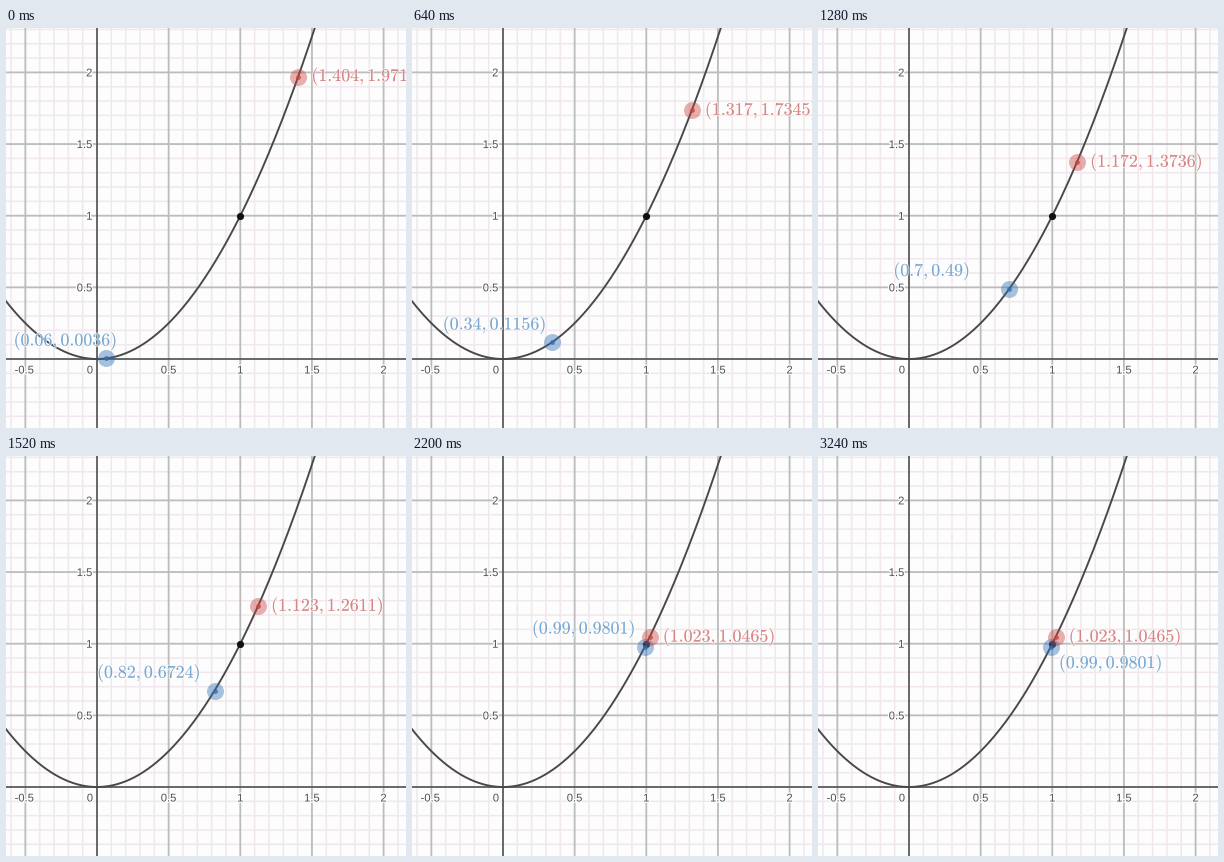
A matplotlib script that plays this animation: 400x400 px, repeating every 3960 ms.

```python
import numpy as np
import matplotlib.pyplot as plt
from matplotlib.animation import FuncAnimation
from matplotlib.patheffects import withStroke

plt.rcParams["mathtext.fontset"] = "cm"
plt.rcParams["toolbar"] = "None"

SIZE, DPI = 400, 100
PT = 72 / DPI          # points per pixel
STEP, LOOP = 40, 3960  # ms
X0, Y0, UNIT = 91, 331, 143.3
PAPER = "#fdfdfd"

# Drag path: time, x of the blue point, x of the red point, blue label offset
DRAG = np.array([
    (0, 0.06, 1.404, -92),
    (240, 0.20, 1.377, -113),
    (520, 0.28, 1.339, -112),
    (920, 0.47, 1.266, -102),
    (1280, 0.70, 1.172, -116),
    (1760, 0.94, 1.074, -119),
    (2200, 0.99, 1.023, -113),
])


def px(x):
    return X0 + UNIT * x


def py(y):
    return Y0 - UNIT * y


def pair(x):
    return f"$({x:g}, {round(x * x, 4):g})$"


def drag(now):
    """Dragged values, refreshed every 80 ms and at each key time."""
    times = DRAG[:, 0]
    t = max(now // 80 * 80, times[times <= now][-1])
    return [float(np.interp(t, times, col)) for col in DRAG.T[1:]]


fig = plt.figure(figsize=(SIZE / DPI, SIZE / DPI), dpi=DPI, facecolor=PAPER)
ax = fig.add_axes([0, 0, 1, 1])
ax.set_xlim(0, SIZE)
ax.set_ylim(SIZE, 0)
ax.axis("off")


def grid_line(k, color, width, z):
    style = dict(color=color, lw=width * PT, zorder=z, snap=False)
    ax.axvline(px(k / 10), **style)
    ax.axhline(py(k / 10), **style)


for k in range(-6, 24):
    if k % 5:
        grid_line(k, "#f0e8ec", 1.5, 1)
    elif k:
        grid_line(k, "#bcbcbc", 1.8, 2)
grid_line(0, "#5a5a5a", 1.8, 3)

xs = np.linspace(-0.7, 1.6, 300)
ax.plot(px(xs), py(xs ** 2), color="#484848", lw=1.9 * PT, zorder=4)


def tick(x, y, s, ha):
    ax.text(x, y, s, ha=ha, va="center_baseline", family="Liberation Sans",
            size=11.2 * PT, color="#505050", zorder=5,
            path_effects=[withStroke(linewidth=2.5 * PT, foreground=PAPER)])


for v in (-0.5, 0.5, 1, 1.5, 2):
    tick(px(v) - (1 if v < 0 else 0), 341.5, f"{v:g}", "center")
    if v > 0:
        tick(86.5, py(v), f"{v:g}", "right")
tick(84, 341.5, "0", "center")


def dot(color, radius, alpha, z):
    return ax.plot([], [], "o", ms=2 * radius * PT, mew=0, color=color,
                   alpha=alpha, zorder=z)[0]


class Point:
    def __init__(self, color, ink, z):
        self.dots = [dot(color, 8.5, 0.42, z), dot(color, 2.4, 0.8, z + 0.1)]
        halo = withStroke(linewidth=2 * PT, foreground=(1, 1, 1, 0.6))
        self.label = ax.text(0, 0, "", size=17.9 * PT, color=ink, ha="left",
                             va="center", zorder=z + 3, path_effects=[halo])

    def place(self, x, dx, dy):
        y = py(x * x)
        for d in self.dots:
            d.set_data([px(x)], [y])
        self.label.set_text(pair(x))
        self.label.set_position((px(x) + dx, y + dy))


dot("#111111", 3.6, 1, 6).set_data([px(1)], [py(1)])
blue = Point("#2d70b3", "#78a8d2", 7)
red = Point("#c74440", "#d88484", 8)


def update(i):
    now = i * STEP
    bx, rx, dx = drag(now)
    # Once the points meet, the blue label slides below the red one
    s = np.clip((now - 2600) / 120, 0, 1)
    blue.place(round(bx, 2), dx + 121 * s, -17.5 + 34.5 * s)
    red.place(round(rx, 3), 13.2, 0)
    return []


anim = FuncAnimation(fig, update, frames=LOOP // STEP, interval=STEP,
                     repeat=True, repeat_delay=0, blit=False)
plt.show()
```
